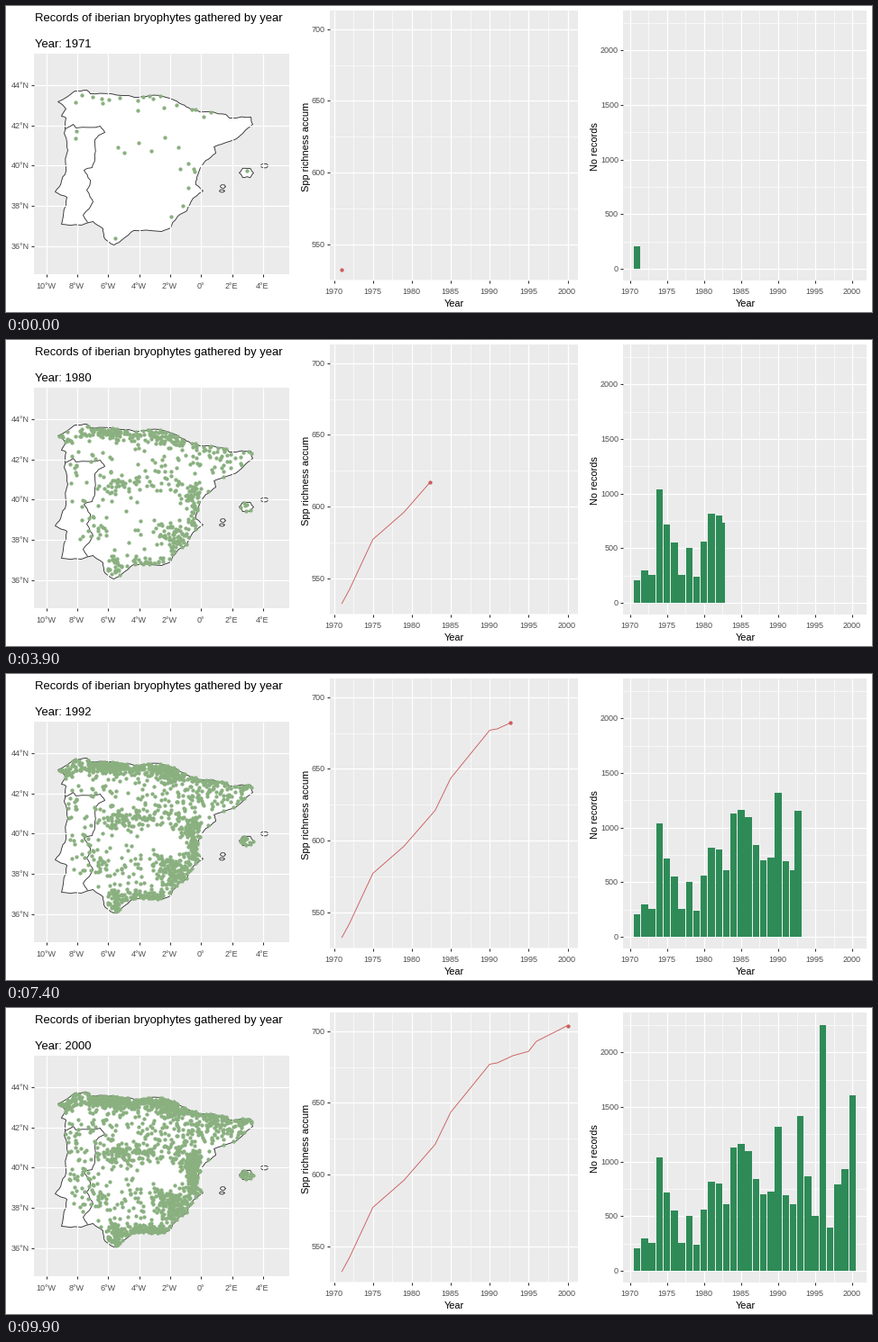
A matplotlib script that plays this animation: 960x340 px, repeating every 10000 ms.

```python
import numpy as np
import matplotlib.pyplot as plt
from matplotlib.animation import FuncAnimation
from matplotlib.patches import Polygon, Rectangle
from matplotlib.path import Path

W, H, DPI = 960, 340, 100
PX = 72 / DPI
FRAMES, INTERVAL = 100, 100
GREY, DARK, TICK = "#EBEBEB", "#333333", "#4D4D4D"
SAGE, RED, GREEN = "#8AB080", "#CD5C5C", "#2E8B57"
DOT = (4.3 * PX) ** 2

plt.rcParams["font.family"] = "Liberation Sans"
rng = np.random.default_rng(71)

YEARS = np.arange(1971, 2001)
KEYS = np.round((YEARS - 1971) * (FRAMES - 1) / 29)
RECORDS = np.array([205, 300, 255, 1035, 715, 550, 255, 500, 240, 565,
                    815, 800, 615, 1130, 1160, 1100, 840, 705, 730, 1320,
                    690, 615, 1420, 865, 500, 2250, 395, 790, 930, 1605])
# The species curve is nearly straight between these years
RICHNESS = np.interp(
    YEARS,
    [1971, 1972, 1975, 1979, 1983, 1985, 1990, 1991, 1993, 1995, 1996, 2000],
    [532, 542, 577, 596, 621, 643.5, 677, 678, 683, 686, 693, 704])

COAST = [(57, 106), (68, 100), (76, 94), (89, 93), (93, 97), (116, 97),
         (142, 101), (158, 99), (181, 102), (195, 109), (204, 114),
         (228, 117), (243, 120), (247, 124), (271, 123), (273, 131),
         (262, 141), (247, 150), (230, 156), (232, 163), (221, 171),
         (211, 190), (210, 198), (218, 205), (207, 213), (200, 227),
         (190, 233), (182, 246), (172, 250), (141, 249), (125, 262),
         (119, 265), (108, 256), (107, 247), (96, 239), (83, 243),
         (61, 242), (66, 221), (67, 212), (54, 206), (61, 194), (66, 178),
         (68, 160), (64, 141), (66, 124), (61, 122), (66, 114)]
BORDER = [(65, 136), (74, 131), (77, 135), (104, 133), (109, 140),
          (98, 148), (98, 170), (95, 179), (86, 182), (93, 193), (89, 204),
          (96, 217), (85, 232), (90, 240)]
# Island centres and radii
ISLES = [(266, 185, 8, 6), (286, 177, 4.5, 2.5), (240, 200, 3, 2),
         (239, 205, 3, 1.5)]

# Well-sampled strips: x0, y0, x1, y1, spread, sites
STRIPS = [
    (58, 112, 88, 96, 5, 90), (92, 100, 133, 104, 3.5, 260),
    (133, 102, 195, 107, 4.5, 250), (172, 108, 190, 122, 6, 60),
    (195, 113, 270, 125, 3, 230), (210, 136, 262, 138, 8, 100),
    (85, 115, 190, 142, 14, 120), (100, 166, 165, 158, 8, 130),
    (190, 150, 200, 172, 9, 70), (205, 160, 211, 205, 5, 200),
    (165, 212, 205, 214, 6, 110), (175, 224, 198, 232, 7, 100),
    (117, 240, 124, 262, 4, 70), (124, 248, 182, 246, 3.5, 160),
    (70, 130, 95, 225, 9, 75), (100, 195, 165, 235, 15, 70),
    (257, 186, 273, 182, 3, 24),
]


def scale(v0, p0, v1, p1):
    return lambda v: p0 + (np.asarray(v, float) - v0) * (p1 - p0) / (v1 - v0)


def rough(points, closed=True):
    """Ragged shore by repeated midpoint displacement."""
    pts = np.array(points, float)
    for _ in range(2):
        nxt = np.roll(pts, -1, axis=0)
        gap = np.hypot(*(nxt - pts).T)[:, None]
        mid = (pts + nxt) / 2 + rng.normal(0, 0.06, pts.shape) * gap
        pts = np.stack([pts, mid], axis=1).reshape(-1, 2)
        pts = pts if closed else pts[:-1]
    return pts


def isle(cx, cy, rx, ry):
    a = np.linspace(0, 2 * np.pi, 7)[:-1]
    return rough(np.column_stack([cx + rx * np.cos(a), cy + ry * np.sin(a)]))


def sites(lands):
    """Random sites on land, ordered by the year of the first record."""
    pts = []
    for x0, y0, x1, y1, spread, n in STRIPS:
        t = rng.random((n, 1))
        pts.append(np.array([x0, y0]) + t * np.array([x1 - x0, y1 - y0])
                   + rng.normal(0, spread, (n, 2)))
    pts = np.concatenate(pts)
    pts = pts[np.any([Path(p).contains_points(pts) for p in lands], axis=0)]
    # Later records fall more often on sites already known
    new = RECORDS / (YEARS - 1961)
    years = np.sort(rng.choice(YEARS, len(pts), p=new / new.sum()))
    return rng.permutation(pts), years


fig = plt.figure(figsize=(W / DPI, H / DPI), dpi=DPI, facecolor="white")
ax = fig.add_axes([0, 0, 1, 1])
ax.set_xlim(-0.5, W - 0.5)
ax.set_ylim(H - 0.5, -0.5)
ax.axis("off")


def label(x, y, text, size, color="black", ha="center", va="baseline", **kw):
    return ax.text(x, y, text, fontsize=size * PX, color=color,
                   ha=ha, va=va, **kw)


def stroke(x, y, color, width=1.07, **kw):
    return ax.plot(x, y, color=color, lw=width * PX,
                   solid_capstyle="butt", **kw)[0]


def panel(x0, y0, x1, y1, xticks, yticks, xminor=(), yminor=()):
    """Grey panel with grid, ticks and labels; ticks are (position, text)."""
    ax.add_patch(Rectangle((x0 - 0.5, y0 - 0.5), x1 - x0, y1 - y0,
                           fc=GREY, lw=0))
    xs = [(x, 0.6) for x in xminor] + [(x, 1.2) for x, _ in xticks]
    ys = [(y, 0.6) for y in yminor] + [(y, 1.2) for y, _ in yticks]
    for x, w in xs:
        stroke([x, x], [y0 - 0.5, y1 - 0.5], "white", w)
    for y, w in ys:
        stroke([x0 - 0.5, x1 - 0.5], [y, y], "white", w)
    for x, text in xticks:
        stroke([x, x], [y1 - 0.5, y1 + 2.5], DARK)
        label(x - 0.5, y1 + 15, text, 9, TICK)
    for y, text in yticks:
        stroke([x0 - 3.5, x0 - 0.5], [y, y], DARK)
        label(x0 - 5.5, y + 3, text, 9, TICK, ha="right")


def chart(x0, x1, y0, y1, x, y, yticks, yminor, title):
    """Panel with a shared year axis and a rotated title."""
    panel(x0, y0, x1, y1,
          [(x(v), str(v)) for v in range(1970, 2001, 5)],
          [(y(v), str(v)) for v in yticks],
          x(np.arange(1972.5, 2000, 5)), y(yminor))
    label((x0 + x1) / 2, 333, "Year", 11)
    label(x0 - 27 - 5 * (x0 > W / 2), 156, title, 11,
          va="center", rotation=90)


# Map
lon, lat = scale(-10, 44.3, 4, 284.5), scale(44, 87.5, 36, 266.3)
panel(31, 53, 314, 298,
      [(lon(v), f"{abs(v)}°" + ("W" if v < 0 else "E" if v else ""))
       for v in range(-10, 5, 2)],
      [(lat(v), f"{v}°N") for v in range(36, 45, 2)])
lands = [rough(COAST)] + [isle(*i) for i in ISLES]
for land in lands:
    ax.add_patch(Polygon(land, fc="white", ec=DARK, lw=0.9 * PX))
stroke(*rough(BORDER, closed=False).T, DARK, 0.9)
PTS, PT_YEARS = sites(lands)
dots = ax.scatter([], [], s=DOT, c=SAGE, lw=0, antialiased=False, zorder=3)
label(31, 17, "Records of iberian bryophytes gathered by year", 13, ha="left")
year_text = label(31, 45, "", 13, ha="left")

# Accumulated richness
lx, ly = scale(1970, 363, 2000, 622), scale(550, 264, 700, 25.4)
chart(359, 634, 5, 305, lx, ly, range(550, 701, 50),
      np.arange(525, 700, 50), "Spp richness accum")
curve = stroke([], [], RED, 0.9, zorder=3)
head = ax.scatter([], [], s=DOT, c=RED, lw=0, antialiased=False, zorder=4)

# Records per year
bx, by = scale(1970, 691, 2000, 937.8), scale(0, 291.7, 2000, 48.8)
chart(684, 954, 5, 305, bx, by, range(0, 2001, 500),
      np.arange(250, 2251, 500), "No records")


def bar(year, value):
    w = 0.9 * (bx(1) - bx(0))
    return bx(year) - w / 2, by(value), w, by(0) - by(value)


bars = []
for _ in range(len(YEARS) + 1):
    bars.append(ax.add_patch(Rectangle((0, 0), 0, 0, fc=GREEN, lw=0,
                                       zorder=3)))
for b, year, value in zip(bars, YEARS, RECORDS):
    b.set_bounds(*bar(year, value))


def map_year(i):
    """Four frames a year at first, three from 1982 on."""
    return 1971 + (i // 4 if i < 44 else 11 + (i - 44) // 3)


def draw(i):
    year = map_year(i)
    year_text.set_text(f"Year: {year}")
    dots.set_offsets(PTS[:np.searchsorted(PT_YEARS, year, side="right")])

    now = np.interp(i, KEYS, YEARS)
    done = int(np.sum(KEYS <= i))
    rich = np.interp(now, YEARS, RICHNESS)
    curve.set_data(lx(np.append(YEARS[:done], now)),
                   ly(np.append(RICHNESS[:done], rich)))
    head.set_offsets([[lx(now), ly(rich)]])

    for k, b in enumerate(bars[:-1]):
        b.set_visible(k < done)
    bars[-1].set_bounds(*bar(now, np.interp(now, YEARS, RECORDS)))
    return dots, year_text, curve, head, *bars


anim = FuncAnimation(fig, draw, frames=FRAMES, interval=INTERVAL,
                     repeat=True, repeat_delay=0, blit=False)
plt.show()
```
